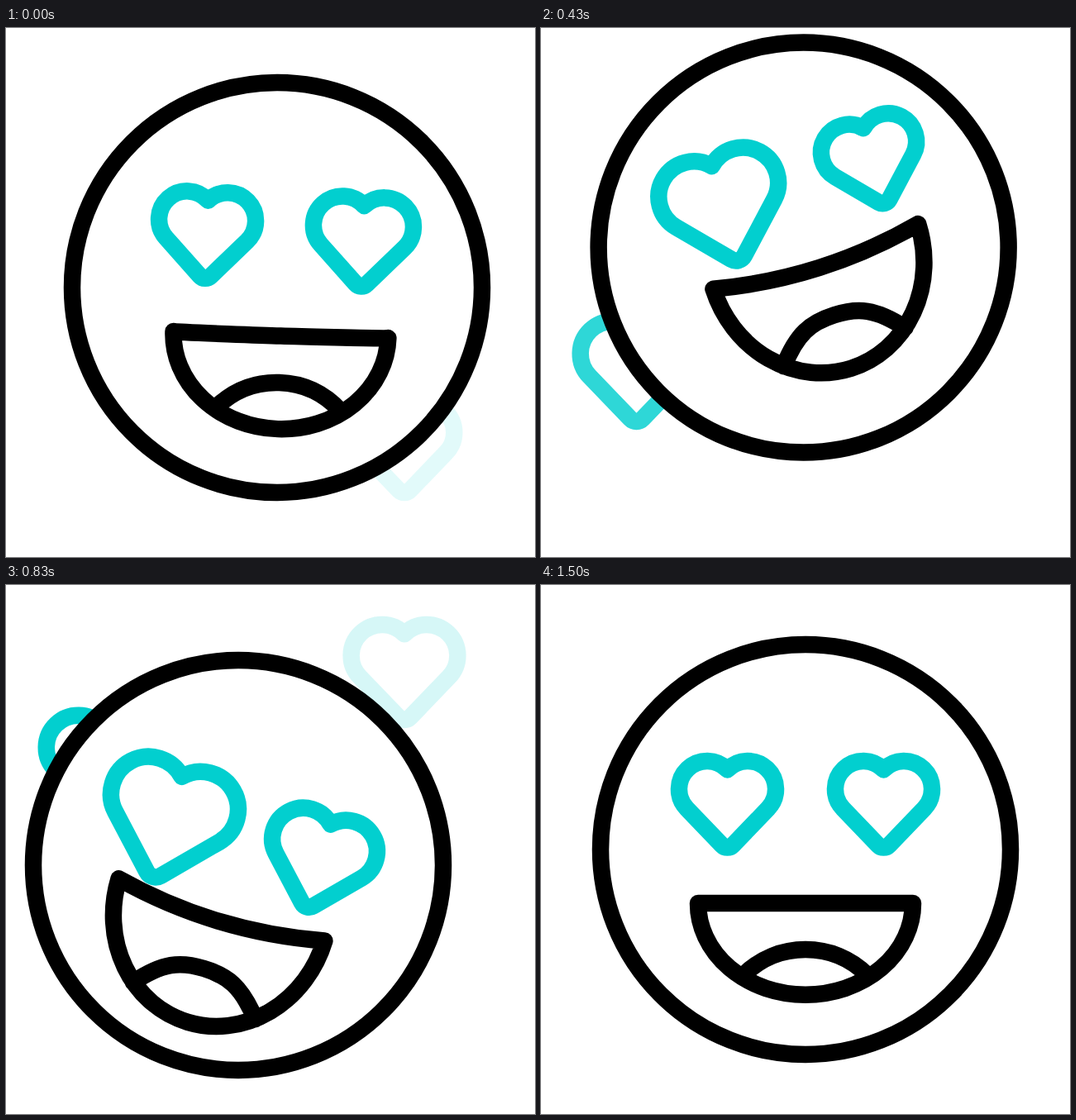
These frames come from a looping animation (640x640 px, 1.67 s). An HTML page:

```html
<!DOCTYPE html>
<html lang="en">
<head>
<meta charset="utf-8">
<title>Heart eyes</title>
<style>
  html, body { margin: 0; height: 100%; overflow: hidden; background: #fff; }
  svg { display: block; width: 100vw; height: 100vh; fill: none; stroke: #000;
        stroke-width: 20.5; stroke-linecap: round; stroke-linejoin: round; }
  .heart { stroke: #02cfcf; }
</style>
</head>
<body>
<svg viewBox="0 0 640 640">
  <defs>
    <path id="heart" d="M0-23.6A34 34 0 0 0-49 23.6L-6.5 67.8A9 9 0 0 0 6.5 67.8L49 23.6A34 34 0 0 0 0-23.6Z"/>
  </defs>
  <use id="floatRight" class="heart" href="#heart"/>
  <use id="floatLeft" class="heart" href="#heart"/>
  <circle id="head" r="248" fill="#fff"/>
  <g id="face">
    <use id="eyeLeft" class="heart" href="#heart"/>
    <use id="eyeRight" class="heart" href="#heart"/>
    <path id="mouth"/>
  </g>
</svg>
<script>
const LOOP = 1670, STEP = 100 / 3, LAST = 45;
const el = id => document.getElementById(id);
const mix = (a, b, k) => a + (b - a) * k;

// Smooth curve through [time, value] knots that never overshoots them.
function curve(knots) {
  const slope = i => {
    const a = knots[i], b = knots[i + 1];
    return a && b ? (b[1] - a[1]) / (b[0] - a[0]) : 0;
  };
  const tangent = i => {
    if (i === 0) return slope(0);
    const a = slope(i - 1), b = slope(i);
    return a * b <= 0 ? 0 : 2 * a * b / (a + b);
  };
  return t => {
    const end = knots.length - 1;
    if (t <= knots[0][0]) return knots[0][1];
    if (t >= knots[end][0]) return knots[end][1];
    const i = knots.findIndex(k => k[0] > t) - 1;
    const [t0, v0] = knots[i], [t1, v1] = knots[i + 1];
    const w = t1 - t0, u = (t - t0) / w, r = 1 - u;
    return r * r * (1 + 2 * u) * v0 + u * u * (3 - 2 * u) * v1
      + w * u * r * (r * tangent(i) - u * tangent(i + 1));
  };
}

const BEATS = [0, 5, 10, 17, 25, 35, 45];
const onBeats = (...values) => curve(values.map((v, i) => [BEATS[i], v]));

const headX = curve([[0, 8], [5, 32], [7.5, 40], [10, 30], [16, -35.5], [17, -40], [20.5, -53.5], [25, -39], [32, -5.7], [35, 0]]);
const headY = curve([[0, -6], [5, -24], [10, -55], [11.5, -58.5], [17, -27], [25, 19], [26, 19.6], [32, 3.75], [35, 0]]);
const faceX = curve([[0, 15.2], [5, 64.4], [7, 71], [10, 57.6], [17, -65.2], [20, -73], [25, -45.5], [35, 0]]);
const faceY = curve([[0, -11.1], [5, -36.1], [10, -87.1], [11.5, -89], [17, -23.9], [25, 38.6], [26, 39], [35, 0]]);
const faceTurn = curve([[0, 2.2], [5, 18.5], [6, 19], [10, 1.1], [14, -18], [17, -10.9], [23, 18], [25, 16.1], [32, -14], [35, -10], [41, 0]]);
const mouthTurn = onBeats(-.4, -3.9, 1.1, -6.1, .7, -.3, 0);
const mouthLift = curve([[0, 2.8], [5, 26.5], [17, 28.5], [29, 28], [35, 8], [39, 0]]);
const smile = curve([[0, .11], [5, 1], [30, 1], [35, .17], [37, 0]]);
const beatLeft = onBeats(0, 81, 180, 325, 550, 862, 1080);
const beatRight = onBeats(37, 117, 300, 443, 654, 823, 1080);
const floatY = curve([[-1, 506], [0, 489.4], [17, 207.7], [25, 85.3], [27, 55]]);
const floatSize = curve([[0, 1.03], [3, 1.16], [18, 1.14], [25, 1.1]]);

function placeHeart(id, x, y, size) {
  el(id).setAttribute("transform", `translate(${x} ${y}) scale(${size})`);
  el(id).setAttribute("stroke-width", 20.5 / size);
}

function drawEye(id, x, phase) {
  placeHeart(id, x, -73, 1 + .17 * (1 - Math.cos(phase * Math.PI / 180)));
}

function drawFloat(id, x, t) {
  const fade = Math.min((t + .9) / 8, (26.3 - t) / 8);
  el(id).setAttribute("opacity", Math.max(0, Math.min(1, fade)));
  placeHeart(id, x, floatY(t), floatSize(t));
}

// Lips and tongue are blended from the resting mouth to the wide smile.
function mouthPath(k) {
  const sag = 14.3 * k, depth = mix(110.7, 142, k);
  const cornerX = mix(130, 87, k), cornerY = 9.5 * k, midX = 43 * k;
  const endX = mix(75, 77, k), endY = mix(87, 115, k);
  const sideX = mix(54.7, 50, k), sideY = mix(66.7, 82, k);
  const topX = mix(28, 30, k), topY = mix(56, 74.3, k);
  return `M-130 0C${-cornerX} ${cornerY} ${-midX} ${sag} 0 ${sag}
    C${midX} ${sag} ${cornerX} ${cornerY} 130 0A130 ${depth} 0 0 1-130 0Z
    M${-endX} ${endY}C${-sideX} ${sideY} ${-topX} ${topY} 0 ${topY}
    C${topX} ${topY} ${sideX} ${sideY} ${endX} ${endY}`;
}

function draw(t) {
  const k = smile(t);
  drawFloat("floatRight", 482, t);
  drawFloat("floatLeft", 115.5, t - 7.3);
  el("head").setAttribute("transform", `translate(${320 + headX(t)} ${320 + headY(t)})`);
  el("face").setAttribute("transform",
    `translate(${320 + faceX(t)} ${320 + faceY(t)}) rotate(${faceTurn(t)})`);
  drawEye("eyeLeft", -94.5, beatLeft(t));
  drawEye("eyeRight", 94.5, beatRight(t));
  el("mouth").setAttribute("transform",
    `translate(${-3.5 * k} ${65 - mouthLift(t)}) rotate(${mouthTurn(t)})`);
  el("mouth").setAttribute("d", mouthPath(k));
}

// The motion advances thirty times a second, then rests until the loop ends.
function tick() {
  const ms = performance.now() % LOOP;
  draw(Math.min(LAST, Math.floor((ms + 4) / STEP)));
  requestAnimationFrame(tick);
}
// CSS would outrank the per-heart stroke width, so hearts take it from the attribute.
document.querySelectorAll(".heart").forEach(h => {
  const group = document.createElementNS("http://www.w3.org/2000/svg", "path");
  group.id = h.id;
  group.setAttribute("class", "heart");
  group.setAttribute("d", el("heart").getAttribute("d"));
  h.replaceWith(group);
});
tick();
</script>
</body>
</html>
```
